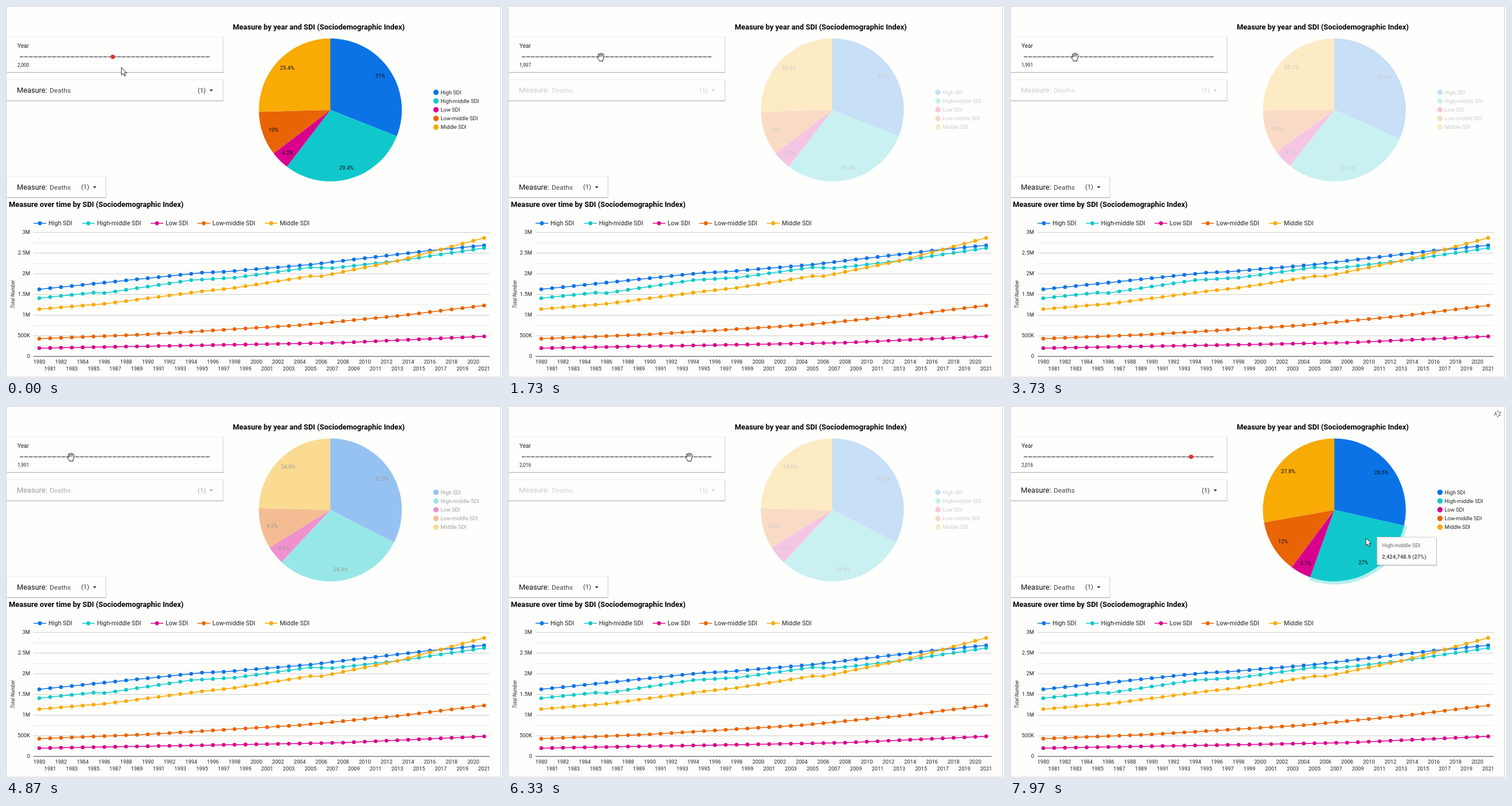
Animation of 864 by 648 pixels, one loop 8 s. Source, as an HTML page:

```html
<!DOCTYPE html>
<html lang="en">
<head>
<meta charset="utf-8">
<title>SDI dashboard</title>
<style>
html, body { margin: 0; width: 100%; height: 100%; overflow: hidden; background: #fefefc; }
svg { display: block; width: 864px; height: 648px; font-family: Roboto, Arial, sans-serif; }
</style>
</head>
<body>
<svg id="stage" viewBox="0 0 864 648"></svg>
<script>
const LOOP = 8000;
const SERIES = [
  // A few knots per curve: years after 1980, height on the stage.
  { name: 'High SDI', color: '#0b73e6', knots: [[0, 493.5], [15, 464.5], [17, 463], [25, 450.5], [36, 426], [41, 417]] },
  { name: 'High-middle SDI', color: '#10c8cb', knots: [[0, 509], [5, 499.3], [6, 500], [14, 477.5], [18, 473.3], [25, 455.3], [27, 456.7], [33, 444], [41, 421.6]] },
  { name: 'Low SDI', color: '#da008e', knots: [[0, 596], [20, 589.3], [28, 586.5], [41, 575.5]] },
  { name: 'Low-middle SDI', color: '#e86405', knots: [[0, 579.6], [10, 572], [24, 556], [33, 540], [41, 521.7]] },
  { name: 'Middle SDI', color: '#f8aa05', knots: [[0, 528], [6, 518.8], [15, 497], [18, 491], [25, 470.5], [26, 470.8], [33, 444], [41, 404]] }
];
// Each drag ends on a year, whose shares appear once loaded.
const DRAGS = [
  { end: -LOOP, year: 2000, shares: [31, 29.4, 4.2, 10, 25.4] },
  { end: 1390, year: 1997, shares: [31.6, 29.1, 4.3, 9.9, 25.1] },
  { end: 3490, year: 1991, shares: [32.5, 29.4, 4.2, 9.2, 24.6] },
  { end: 5900, year: 2016, shares: [28.5, 27, 4.7, 12, 27.8] }
];
const DRAG_TIME = 350, FADE_OUT = 170, LOADING = 1250, FADE_IN = 500, DIM = .22;
const GRAB = 650, LEAVE = 7400, ARRIVE = 7860;
const PIE = { x: 565, y: 181, r: 124.5 };

const stage = document.getElementById('stage');

function add(tag, attrs, parent = stage, text) {
  const el = document.createElementNS('http://www.w3.org/2000/svg', tag);
  for (const k in attrs) el.setAttribute(k, attrs[k]);
  if (text !== undefined) el.textContent = text;
  parent.appendChild(el);
  return el;
}
function label(x, y, size, text, attrs = {}, parent = stage) {
  return add('text', { x, y, 'font-size': size, fill: '#212121', ...attrs }, parent, text);
}
function line(x1, y1, x2, y2, stroke, attrs = {}) {
  return add('line', { x1, y1, x2, y2, stroke, ...attrs });
}
function dot(cx, cy, r, fill, parent = stage) {
  return add('circle', { cx, cy, r, fill }, parent);
}
function show(el, on) { el.setAttribute('display', on ? 'inline' : 'none'); }

const mix = (a, b, p) => a + (b - a) * p;
const progress = (t, from, to) => Math.min(1, Math.max(0, (t - from) / (to - from)));
function smooth(t, from, to) {
  const p = progress(t, from, to);
  return p * p * (3 - 2 * p);
}
function curveAt(knots, x) {
  const i = Math.max(1, knots.findIndex(k => k[0] >= x));
  const [x0, y0] = knots[i - 1], [x1, y1] = knots[i];
  return mix(y0, y1, progress(x, x0, x1));
}
const sliderX = year => 24 + (year - 1980) * 332 / 41;

function card(y, w, h) {
  add('rect', { x: 1.5, y: y + 1, width: w, height: h + 1, fill: '#e3e3e0' });
  add('rect', { x: 1.5, y, width: w - .5, height: h, fill: '#fefefc' });
  line(2, y + .5, 1 + w, y + .5, '#eeeeec');
  line(1.5, y + h + .5, 1.5 + w, y + h + .5, '#b9b9b9');
  line(1 + w, y, 1 + w, y + h, '#d2d2d2');
}
function measure(y, countX, parent) {
  label(19, y, 12.8, 'Measure:', { fill: '#111' }, parent);
  label(76, y, 11.8, 'Deaths', { fill: '#424242' }, parent);
  label(countX, y - .5, 11.2, '(1)', { fill: '#333' }, parent);
  add('path', { d: `M${countX + 20.5} ${y - 5.5}h6l-3 3.2z`, fill: '#222' }, parent);
}

// Page frame and control cards
add('rect', { width: 864, height: 648, fill: '#fefefc' });
add('path', { d: 'M.5 646V.5H861.5V646.5H0', fill: 'none', stroke: '#cfcfcd' });
card(53, 377, 62);
card(128, 377, 36.5);
card(297, 173, 36);
label(20, 73, 10, 'Year');
line(24, 88.5, 356, 88.5, '#b8bcc8', { 'stroke-width': 1.3 });
line(24, 88.5, 356, 88.5, '#5f6368', { 'stroke-width': 1.3, 'stroke-dasharray': '6 2.1' });
const yearText = label(20, 106, 8.2, '');
const handle = dot(0, 88.5, 3.8, '#e8302c');
measure(319.7, 131, stage);

// Pie chart
const title = { 'font-weight': 700, fill: '#000' };
label(395, 40.5, 12.9, 'Measure by year and SDI (Sociodemographic Index)', title);
const fading = add('g', {});
measure(151, 334, fading);
const halo = add('path', { fill: SERIES[1].color, 'fill-opacity': .3 }, fading);
const slices = SERIES.map(s => add('path', { fill: s.color }, fading));
const shareTexts = SERIES.map(() => label(0, 0, 9.4, '', { 'text-anchor': 'middle', fill: '#111' }, fading));
SERIES.forEach((s, i) => {
  const y = 150.4 + i * 15.15;
  dot(749, y, 4.7, s.color, fading);
  label(757, y + 3.4, 9.4, s.name, {}, fading);
});

function polar(frac, r) {
  const a = frac * 2 * Math.PI;
  return [PIE.x + r * Math.sin(a), PIE.y - r * Math.cos(a)];
}
function wedge(a, b, r) {
  return `M${PIE.x} ${PIE.y}L${polar(a, r)}A${r} ${r} 0 0 1 ${polar(b, r)}Z`;
}
function drawPie(shares) {
  const total = shares.reduce((sum, v) => sum + v);
  let from = 0;
  shares.forEach((v, i) => {
    const to = from + v / total;
    slices[i].setAttribute('d', wedge(from, to, PIE.r));
    if (i === 1) halo.setAttribute('d', wedge(from, to, PIE.r + 5.5));
    const [x, y] = polar((from + to) / 2, 105);
    shareTexts[i].setAttribute('x', x);
    shareTexts[i].setAttribute('y', y + 3.3);
    shareTexts[i].textContent = v + '%';
    from = to;
  });
}

// Line chart
label(5, 349.5, 12.9, 'Measure over time by SDI (Sociodemographic Index)', title);
[59, 143.5, 263, 344.5, 462].forEach((x, i) => {
  line(x - 11, 378.5, x + 11, 378.5, SERIES[i].color, { 'stroke-width': 1.5 });
  dot(x, 378.5, 3.4, SERIES[i].color);
  label(x + 15, 382.3, 10.8, SERIES[i].name);
});
for (let i = 1; i <= 12; i++) {
  const y = 610.5 - i * 18;
  line(48, y, 842.5, y, i % 2 ? '#e9e9e6' : '#cdcdcd');
}
['0', '500K', '1M', '1.5M', '2M', '2.5M', '3M'].forEach((text, i) =>
  label(42, 613.3 - i * 36, 9.4, text, { 'text-anchor': 'end' }));
line(48, 610.3, 842.5, 610.3, '#444');
label(0, 0, 8.3, 'Total Number', {
  'text-anchor': 'middle', 'font-style': 'italic', transform: 'translate(15 502) rotate(-90)'
});
const years = Array.from({ length: 42 }, (_, i) => i);
const chartX = i => 58 + i * 18.9;
years.forEach(i => label(chartX(i), i % 2 ? 634.6 : 622.6, 9.2, 1980 + i, { 'text-anchor': 'middle' }));
SERIES.forEach(({ knots, color }) => {
  const points = years.map(i => [chartX(i), curveAt(knots, i)]);
  add('polyline', { points: points.join(' '), fill: 'none', stroke: color, 'stroke-width': 1.5 });
  points.forEach(([x, y]) => dot(x, y, 3.3, color));
});

// Hover extras
const sortIcon = add('g', {});
label(843, 17, 8.8, 'A', { fill: '#444' }, sortIcon);
label(850.5, 17, 8.8, 'Z', { fill: '#444' }, sortIcon);
add('path', { d: 'M848 9.4l1.6-1.8 1.6 1.8zM848 18l1.6 1.8 1.6-1.8z', fill: '#444' }, sortIcon);

const tooltip = add('g', {});
add('rect', { x: 641, y: 230, width: 103, height: 49, fill: '#000', opacity: .13 }, tooltip);
add('rect', { x: 639.5, y: 228.5, width: 103, height: 48, fill: '#fefefc', stroke: '#cfcfd4' }, tooltip);
label(648, 246, 9.4, SERIES[1].name, { fill: '#666' }, tooltip);
label(648, 266, 9.4, '2,424,748.9 (27%)', { 'font-weight': 700, fill: '#555' }, tooltip);

// Pointers
const arrow = add('path', {
  d: 'M0 0V13.2L3.1 10.4 5.2 15.2 7.4 14.2 5.3 9.6H9.4Z',
  fill: '#fff', stroke: '#222', 'stroke-linejoin': 'round'
});
const hand = add('g', { fill: '#fff', stroke: '#111', 'stroke-linejoin': 'round', 'stroke-linecap': 'round' });
add('path', {
  d: 'M-2.5 6.8C-3 5-5 3.2-6.3 1C-7-.6-5.3-1.4-3.5 .6L-4.6-3.6C-4.9-5.4-3.2-5.8-2.6-4.2C-2.6-7-.4-7.2 .1-5.4C.6-7.2 2.5-6.8 2.7-4.8C3.6-5.9 5.4-5.2 5.3-3.4C5.4 0 5.4 2 3.8 4.4L3.6 6.8Z'
}, hand);
add('path', { d: 'M-2.6-4.2L-1.8-.8M.1-5.4V-1M2.7-4.8L2.3-.8', fill: 'none', 'stroke-width': .9 }, hand);

let shown;
function render(t) {
  const index = DRAGS.findLastIndex(d => d.end <= t);
  const current = DRAGS[index], next = DRAGS[index + 1];
  const since = t - current.end;

  const position = next
    ? mix(current.year, next.year, smooth(t, next.end - DRAG_TIME, next.end))
    : current.year;
  const year = Math.round(position);
  handle.setAttribute('cx', sliderX(year));
  yearText.textContent = year.toLocaleString('en-US');

  const loaded = since >= LOADING;
  const opacity = loaded
    ? mix(DIM, 1, progress(since, LOADING, LOADING + FADE_IN))
    : mix(1, DIM, progress(since, 0, FADE_OUT));
  fading.setAttribute('opacity', opacity);
  const { shares } = DRAGS[loaded ? index : index - 1];
  if (shares !== shown) drawPie(shown = shares);

  const approach = smooth(t, 150, GRAB), leave = smooth(t, LEAVE, ARRIVE);
  const x = mix(mix(201, sliderX(position), approach), 620, leave);
  const y = mix(mix(107, 88.8, approach), 230, leave);
  const holding = t > GRAB && t < LEAVE;
  show(hand, holding);
  show(arrow, !holding);
  (holding ? hand : arrow).setAttribute('transform', `translate(${x} ${y})`);

  const hovering = leave > .95;
  show(halo, hovering);
  show(tooltip, hovering);
  show(sortIcon, x > 390);
}

const start = performance.now();
function tick() {
  render((performance.now() - start) % LOOP);
  requestAnimationFrame(tick);
}
tick();
</script>
</body>
</html>
```
